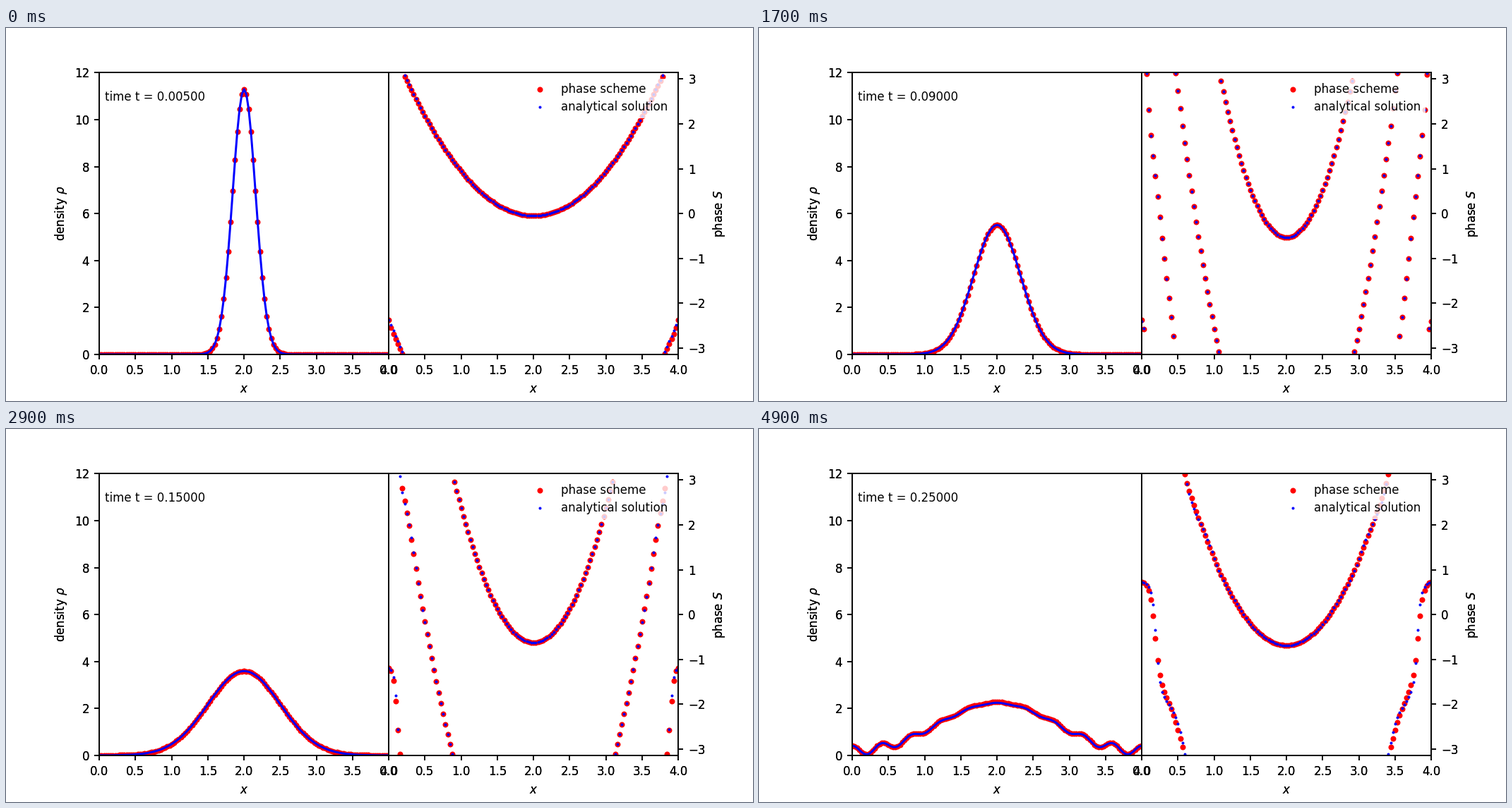
A matplotlib script for the animation above (5 s loop, 1058 px wide and 529 px high).

```python
import numpy as np
import matplotlib.pyplot as plt
from matplotlib.animation import FuncAnimation

plt.rcParams.update({"font.family": "DejaVu Sans", "font.size": 25 / 3})

DPI = 144
FRAMES, DT = 50, 0.005
LENGTH, CELLS = 4.0, 128
TAU, PEAK = 0.05, 4.5 / np.sqrt(2 * np.pi * 0.025)

x = np.linspace(0, LENGTH, CELLS + 1)
edge = np.minimum(x, LENGTH - x)


def bump(u, center, width):
    return np.exp(-((u - center) / width) ** 2)


def wrap(s):
    return (s + np.pi) % (2 * np.pi) - np.pi


def density(t):
    """Spreading Gaussian packet, summed over its periodic images."""
    a = t / TAU
    b = 10 / (1 + 1j * a)
    psi = sum(np.exp(-b * (x - 2 - LENGTH * n) ** 2) for n in range(-2, 3))
    return PEAK / np.sqrt(1 + a * a) * np.abs(psi) ** 2


def phase(t, damp=1.0, shift=0.0):
    """Phase of the packet and its mirror image at the nearest wall."""
    a = t / TAU
    b = 10 / (1 + 1j * a)
    u = 4 * b.real * edge * damp
    v = 4 * b.imag * edge * (1 + shift * bump(edge, 0, 0.35))
    fringe = np.angle(np.cosh(u + 1j * v))
    return wrap(-b.imag * (4 + edge ** 2) - np.arctan(a) / 2 + fringe)


def scheme_density(t):
    return density(t) * (1 + 0.02 * (t / 0.25) ** 10)


# The scheme lags in the near-vacuum cells and is noisy right at the walls
noise = np.random.default_rng(4).uniform(-1.4, 1.4, x.size)
error = (noise * bump(edge, 0, 0.07)
         - 1.6 * bump(edge, 0.15, 0.06) - 0.55 * bump(edge, 0.36, 0.23))
lag = -0.1 * bump(edge, 0, 0.25) * (edge > 0)


def scheme_phase(t):
    late = np.clip((t - 0.07) / 0.18, 0, 1)
    smeared = phase(t, damp=1 + 0.6 * late ** 0.7,
                    shift=0.3 * (t - 0.18) * np.sqrt(late))
    return wrap(smeared + lag * np.exp(-t / 0.02)
                + error * bump(t, 0.055, 0.018))


def panel(fig, left, label, ylim, yticks, right=False, overlay=False):
    ax = fig.add_axes([left, 0.125, 0.3875, 0.755])
    ax.set(xlim=(0, LENGTH), ylim=ylim, xlabel="$x$", ylabel=label,
           xticks=np.arange(0, 4.1, 0.5), yticks=yticks)
    if right:
        ax.yaxis.tick_right()
        ax.yaxis.set_label_position("right")
    ax.patch.set_visible(not overlay)
    return ax


def panels(fig, overlay=False):
    return (panel(fig, 0.125, r"density $\rho$", (0, 12), range(0, 13, 2),
                  overlay=overlay),
            panel(fig, 0.5125, "phase $S$", (-np.pi, np.pi), range(-3, 4),
                  right=True, overlay=overlay))


fig = plt.figure(figsize=(1058 / DPI, 529 / DPI), dpi=DPI, facecolor="white")
ax_rho, ax_s = panels(fig)
panels(fig, overlay=True)  # second pass gives the heavier axes and labels

rho_num, = ax_rho.plot([], [], "r.", ms=6)
rho_ref, = ax_rho.plot([], [], "b-", lw=1.5)
s_num, = ax_s.plot([], [], "r.", ms=6, label="phase scheme")
s_ref, = ax_s.plot([], [], "b.", ms=2, label="analytical solution")
clock = ax_rho.text(0.02, 0.9, "", transform=ax_rho.transAxes)
ax_s.legend(loc="upper right", framealpha=0.8, edgecolor="none",
            labelspacing=0.42)


def update(i):
    t = DT * (i + 1)
    rho_num.set_data(x, scheme_density(t))
    rho_ref.set_data(x, density(t))
    s_num.set_data(x, scheme_phase(t))
    s_ref.set_data(x, phase(t))
    clock.set_text(f"time t = {t:.5f}")
    return rho_num, rho_ref, s_num, s_ref, clock


anim = FuncAnimation(fig, update, frames=FRAMES, interval=100, repeat=True)
plt.show()
```
